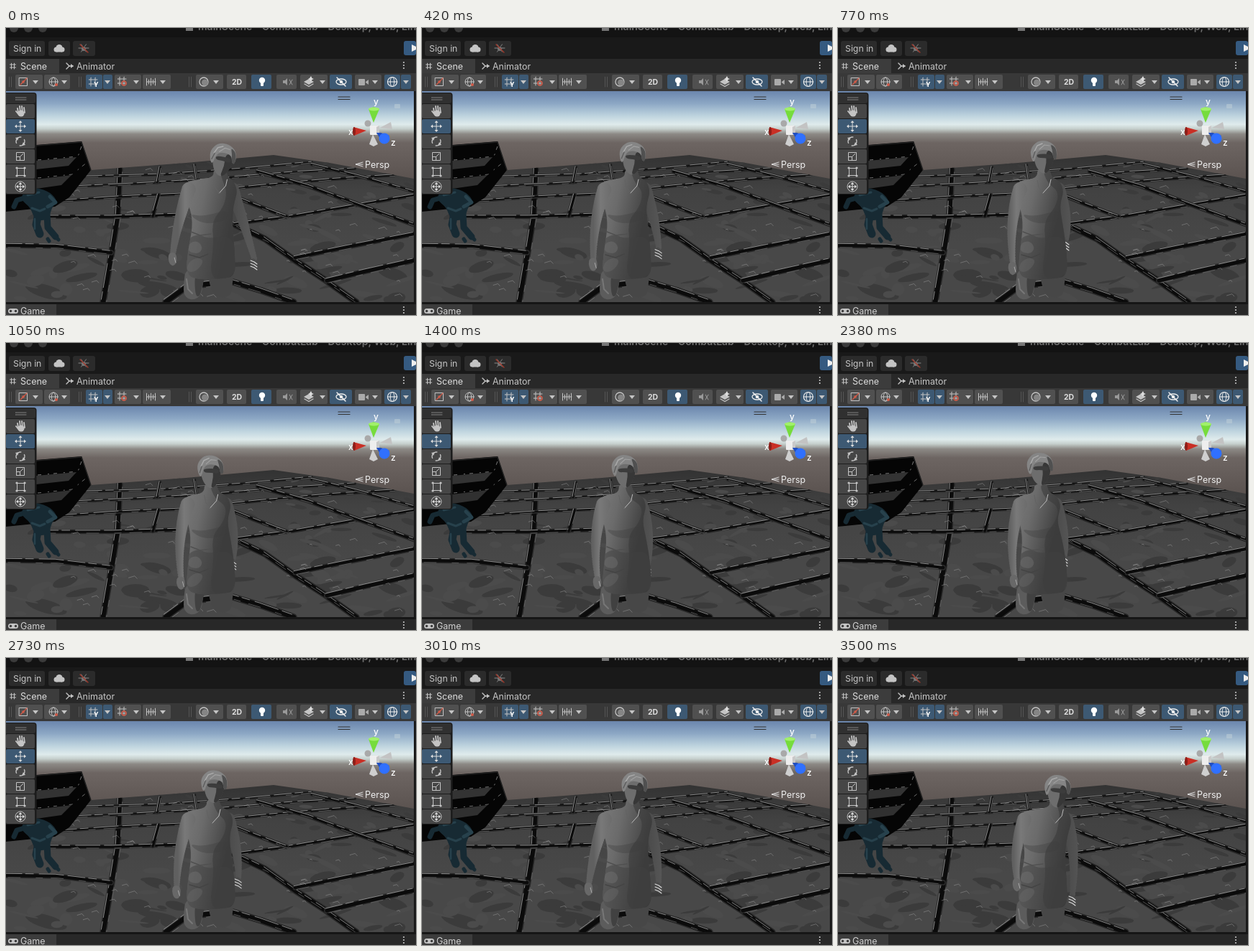
These frames come from a looping animation (570x400 px, 3.57 s). An HTML page with a canvas:

```html
<!DOCTYPE html>
<html lang="en">
<head>
<meta charset="utf-8">
<title>Scene view</title>
<style>
  html, body { margin: 0; width: 100%; height: 100%; overflow: hidden; background: #191919; }
  canvas { display: block; }
</style>
</head>
<body>
<canvas id="stage" width="570" height="400"></canvas>
<script>
const LOOP = 3570, STEP = 70;
const stage = document.getElementById('stage').getContext('2d');
const backdrop = document.createElement('canvas');
backdrop.width = 570;
backdrop.height = 400;
let c = backdrop.getContext('2d');

let seed = 11;
const rand = () => (seed = (seed * 16807) % 2147483647) / 2147483647;

// ---- drawing helpers ----
function box(x, y, w, h, fill, r = 0) {
  c.fillStyle = fill;
  c.beginPath();
  c.roundRect(x, y, w, h, r);
  c.fill();
}
function trace(p) {
  c.beginPath();
  for (let i = 0; i < p.length; i += 2) c.lineTo(p[i], p[i + 1]);
}
function poly(p, fill) {
  trace(p);
  c.fillStyle = fill;
  c.fill();
}
function line(p, color, w = 1) {
  trace(p);
  c.strokeStyle = color;
  c.lineWidth = w;
  c.stroke();
}
function disc(x, y, rx, fill, ry = rx, angle = 0) {
  c.fillStyle = fill;
  c.beginPath();
  c.ellipse(x, y, rx, ry, angle, 0, 7);
  c.fill();
}
function ring(x, y, rx, color, ry = rx, w = 1) {
  c.strokeStyle = color;
  c.lineWidth = w;
  c.beginPath();
  c.ellipse(x, y, rx, ry, 0, 0, 7);
  c.stroke();
}
// Closed smooth outline through the midpoints of a polygon
function blob(p, fill) {
  const n = p.length, at = i => p[(i + n) % n];
  c.beginPath();
  for (let i = 0; i < n; i += 2) {
    const mx = (at(i) + at(i + 2)) / 2, my = (at(i + 1) + at(i + 3)) / 2;
    if (!i) c.moveTo((at(-2) + at(0)) / 2, (at(-1) + at(1)) / 2);
    c.quadraticCurveTo(at(i), at(i + 1), mx, my);
  }
  c.fillStyle = fill;
  c.fill();
}
function text(s, x, y, size = 12.5, color = '#c4c4c4', weight = 400) {
  c.font = `${weight} ${size}px Inter, sans-serif`;
  c.fillStyle = color;
  c.fillText(s, x, y);
}
function ramp(x0, y0, x1, y1, ...stops) {
  const g = c.createLinearGradient(x0, y0, x1, y1);
  stops.forEach(([at, color]) => g.addColorStop(at, color));
  return g;
}

// ---- 3D view ----
const SEAMS = [
  [158, 197, 155, 262, 147, 312, 135, 382],
  [110, 207, 220, 204, 330, 196, 425, 187],
  [95, 221, 180, 217, 280, 211, 400, 201, 485, 196],
  [75, 241, 160, 235, 250, 231, 350, 220, 450, 211, 540, 205],
  [50, 263, 150, 263, 245, 260],
  [0, 303, 70, 304, 146, 313],
  [214, 194, 210, 215], [262, 191, 265, 212], [212, 233, 204, 262],
  [318, 274, 360, 294, 402, 324, 442, 350, 487, 382],
  [318, 273, 400, 262, 480, 248, 567, 233],
  [402, 320, 480, 304, 567, 287],
  [318, 235, 345, 246, 390, 263],
  [350, 200, 420, 220, 490, 246, 567, 274],
  [425, 190, 490, 206, 567, 228],
  [446, 352, 500, 339, 567, 324],
  [222, 382, 252, 360, 312, 353, 355, 366, 400, 382]
];

function drawFloor() {
  c.save();
  trace([0, 256, 70, 245, 118, 198, 250, 188, 372, 177, 450, 188, 567, 210, 567, 382, 0, 382]);
  c.clip();
  box(0, 170, 567, 212, ramp(0, 178, 0, 300, [0, '#333'], [.4, '#424242'], [1, '#484848']));
  for (let i = 0; i < 150; i++) {
    const y = 185 + 197 * rand(), s = (y - 165) / 200;
    disc(567 * rand(), y, 5 + 25 * s * rand(), i % 2 ? '#3b3b3b' : '#4b4b4b', 1 + 8 * s * rand(), rand() - .5);
  }
  c.lineCap = c.lineJoin = 'round';
  for (const seam of SEAMS) {
    const w = 1.6 + Math.max(0, seam[seam.length - 1] - 190) / 40;
    line(seam, '#292929', w + 3);
    line(seam, '#0b0b0b', w);
    c.setLineDash([24, 5, 11, 8, 34, 6]);
    line(seam.map((v, i) => v - (i % 2 ? w * .6 : w * .4)), 'rgba(190,190,190,.75)', .9);
    c.setLineDash([17, 22, 9, 12]);
    line(seam.map(v => v + w * .6), 'rgba(150,150,150,.6)', .8);
    c.setLineDash([]);
  }
  for (let i = 0; i < 55; i++) {
    const x = 567 * rand(), y = 195 + 180 * rand(), l = 2 + 7 * rand();
    line([x, y, x + l, y - l * .3, x + l * 1.4, y + 1], 'rgba(165,165,165,.55)', .8);
  }
  c.restore();
}

function drawStairs() {
  poly([0, 166, 42, 163, 105, 158, 118, 198, 88, 236, 68, 249, 0, 256], '#050505');
  poly([42, 185, 98, 180, 87, 192, 42, 197], '#333');
  poly([42, 211, 91, 205, 77, 219, 42, 224], '#303030');
  line([42, 164, 105, 159, 118, 198], '#202020', 1.5);
  c.setLineDash([5, 9, 2, 6]);
  line([44, 184, 100, 179, 106, 162], '#999', .8);
  line([44, 209, 92, 204, 113, 187], '#888', .8);
  c.setLineDash([]);
}

function drawStatue() {
  const dark = '#172a33', mid = '#27414c';
  c.lineCap = c.lineJoin = 'round';
  line([29, 236, 15, 240, 11, 249], dark, 7);
  line([45, 258, 42, 274, 47, 287], dark, 11);
  line([57, 260, 58, 278, 69, 291], dark, 9);
  line([58, 294, 60, 297], dark, 5);
  line([69, 291, 73, 295], dark, 5);
  blob([24, 228, 42, 222, 62, 229, 72, 242, 64, 249, 59, 268, 40, 268, 34, 250, 21, 240], dark);
  line([61, 235, 69, 243, 58, 249], mid, 5);
  line([36, 251, 47, 255, 54, 252], mid, 3);
  line([40, 266, 40, 280], mid, 2.5);
  line([30, 233, 46, 229], mid, 3);
}

function drawAxes() {
  const label = (s, x, y) => text(s, x, y, 12, '#fff', 500);
  poly([520, 139, 535, 131, 537, 141], '#c3c3c3');
  disc(503, 133, 4.5, '#a9a9a9');
  poly([510, 148, 505, 162, 511, 165, 517, 162], '#cfcfcf');
  poly([504, 113, 511, 110, 519, 113, 511, 132], '#76dc3c');
  disc(511.5, 113, 7.5, '#a1f06b', 2.5);
  poly([483, 138, 501, 143, 484, 150], '#c92f25');
  disc(484, 144, 2, '#8d1e18', 6);
  box(506, 136, 13, 13, '#eee', 1);
  poly([515, 138, 519, 136, 519, 147, 515, 149], '#c9c9c9');
  poly([515, 146, 521, 146, 533, 150, 524, 161], '#214fc0');
  disc(526, 154, 7.5, '#3070ff');
  label('y', 511, 107);
  label('x', 476, 149);
  label('z', 535, 164);
  line([496, 187, 486, 190, 496, 193], '#ddd');
  line([486, 190, 496, 190], '#ddd');
  text('Persp', 499, 194.5, 12.5, '#eee');
  box(540, 106, 8, 6, 'rgba(190,205,215,.55)', 1);
  for (const y of [96, 99.5]) line([462, y, 478, y], '#333', 1.2);
}

function drawView() {
  box(0, 88, 567, 294, ramp(0, 88, 0, 210, [0, '#6b86ad'], [.14, '#8ca7c4'], [.28, '#bdd3de'],
    [.38, '#dfebec'], [.43, '#c6d0cd'], [.49, '#8c8985'], [.59, '#6d6562'], [1, '#5b5350']));
  drawFloor();
  drawStairs();
  drawStatue();
  drawAxes();
}

// ---- editor chrome ----
const INK = '#c4c4c4', BUTTON = '#505050', ACTIVE = '#3d5973';
const caret = (x, y = 75) => poly([x - 4, y - 2, x + 4, y - 2, x, y + 3], INK);
const dots = (x, y) => [-4, 0, 4].forEach(d => disc(x, y + d, 1.1, INK));
function grid(x, y, s) {
  for (const d of [-s / 2, s / 2]) {
    line([x - s, y + d, x + s, y + d], INK);
    line([x + d, y - s, x + d, y + s], INK);
  }
}

function drawTopBars() {
  box(0, 0, 570, 43, '#191919');
  box(0, 0, 570, 13, '#131313');
  [11, 31, 51].forEach(x => disc(x, 0, 6, '#3b3b3b'));
  box(250, -5, 10, 9, '#777');
  text('mainScene - CombatLab - Desktop, Web, Linux', 267, 3, 14, '#6e6e6e', 600);
  for (const [x, w] of [[4, 50], [59, 30], [93, 31]]) box(x, 18, w, 21, '#2b2b2b', 3);
  text('Sign in', 10, 33, 12.3);
  [[70, 30, 3.5], [74, 27.5, 4.5], [78, 30, 3.5]].forEach(p => disc(...p, INK));
  box(70, 29, 8, 4.5, INK);
  for (let a = 0; a < 6; a++) {
    const x = Math.cos(a * 1.047), y = Math.sin(a * 1.047);
    line([108 + x * 3, 28 + y * 3, 108 + x * 7, 28 + y * 6], '#888');
  }
  disc(108, 29, 3, '#777');
  line([103, 23, 114, 34], '#a3392b', 1.3);
  box(553, 18, 17, 20, '#355a80', 3);
  poly([564, 23, 570, 26, 570, 30, 564, 33], '#eee');

  box(0, 43, 570, 20, '#282828');
  box(0, 43, 74, 20, '#3c3c3c');
  grid(9.5, 53, 4);
  text('Scene', 20, 57.5, 12.5, '#ddd');
  line([84, 49, 88, 53, 93, 53], INK, 1.4);
  line([84, 57, 88, 53], INK, 1.4);
  poly([90, 50, 94, 53, 90, 56], INK);
  text('Animator', 98, 57.5);
  dots(553, 52);
}

function drawTools() {
  box(0, 63, 570, 25, '#383838');
  [4, 7, 101, 104, 254, 257].forEach(x => line([x + .5, 68, x + .5, 82], '#555'));
  const buttons = [[13, 38], [53, 36], [111, 23, 1], [135, 13, 1], [151, 37], [190, 39], [264, 38], [307, 27],
    [341, 28, 1], [376, 28], [409, 38], [450, 31, 1], [485, 37], [526, 22, 1], [549, 14, 1]];
  for (const [x, w, on] of buttons) box(x, 65, w, 20, on ? ACTIVE : BUTTON, 2);
  [41, 81, 141, 181, 218, 292, 440, 513, 556].forEach(x => caret(x));

  c.strokeStyle = INK;
  c.lineWidth = 1;
  c.strokeRect(18.5, 69.5, 11, 11);
  line([20, 79, 29, 70], '#d05a48', 1.3);
  disc(24, 75, 1.8, '#d05a48');
  ring(66, 75, 6, INK);
  ring(66, 75, 2.7, INK, 6);
  line([60, 75, 72, 75], INK);
  disc(70, 79, 2, '#d05a48');
  grid(121, 75, 6);
  text('Y', 122, 82, 9, '#fff', 700);
  grid(161, 74, 6);
  ring(164, 77, 3, '#d05a48', 3, 1.6);
  for (let i = 0; i < 5; i++) line([195.5 + i * 3, 70 + (i % 2) * 2, 195.5 + i * 3, 80 - (i % 2) * 2], INK);
  line([195, 75, 208, 75], INK);
  ring(275, 75, 6, INK, 6, 1.3);
  disc(276.5, 76, 4.5, '#858585');
  text('2D', 314, 79, 10.5, '#ddd', 700);
  disc(356, 73, 4.2, '#fff');
  box(354, 76, 4, 5, '#fff', 1);
  poly([385, 73, 388, 73, 391, 70, 391, 80, 388, 77, 385, 77], '#999');
  line([394, 72, 398, 79], '#999');
  line([398, 72, 394, 79], '#999');
  poly([414, 75, 421, 71, 428, 75, 421, 79], INK);
  line([415, 78, 421, 81.5, 427, 78], INK, 1.3);
  poly([424, 67, 425.5, 70, 428, 71, 425.5, 72, 424, 75, 422, 72, 420, 71, 422, 70], '#ddd');
  ring(466, 75, 7, '#eee', 4, 1.3);
  disc(466, 75, 2.3, '#eee');
  line([460, 69, 472, 81], '#eee', 1.5);
  box(490, 71, 9, 9, '#aaa', 1);
  poly([500, 75, 504, 72, 504, 79, 500, 76], '#aaa');
  ring(537, 75, 6.5, '#eee', 6.5, 1.2);
  ring(537, 75, 2.8, '#eee', 6.5);
  line([530, 75, 544, 75], '#eee');
}

function drawPalette() {
  box(-4, 90, 46.5, 142, '#1c1c1c', 4);
  box(-4, 91, 45, 14, '#303030', 3);
  for (const y of [97, 100]) line([13, y, 28, y], '#808080');
  for (let i = 0; i < 6; i++) box(0, 106 + i * 21, 40, 20, i === 1 ? ACTIVE : '#464646', 2);
  c.lineCap = 'round';
  disc(21, 119, 4.5, INK);
  [[16, 112], [19, 109], [22, 109], [25, 111]].forEach(([x, y]) => line([x, y, x + 1, 118], INK, 1.8));
  line([14, 116, 18, 121], INK, 2);
  c.lineCap = 'butt';
  const arrows = (y, r) => {
    line([20 - r, y, 20 + r, y], '#ddd');
    line([20, y - r, 20, y + r], '#ddd');
    for (let i = 0; i < 4; i++) {
      c.save();
      c.translate(20, y);
      c.rotate(i * Math.PI / 2);
      poly([r + 1, 0, r - 2, -2.5, r - 2, 2.5], '#ddd');
      c.restore();
    }
  };
  arrows(137, 7);
  for (const a of [-.5, 2.64]) {
    c.beginPath();
    c.arc(20, 158, 6, a, a + 2.3);
    c.strokeStyle = INK;
    c.lineWidth = 1.4;
    c.stroke();
  }
  poly([13, 153, 18, 152, 16, 157], INK);
  poly([27, 163, 22, 164, 24, 159], INK);
  c.lineWidth = 1;
  c.strokeRect(14.5, 173.5, 11, 11);
  c.strokeRect(14.5, 179.5, 5, 5);
  line([19, 180, 24, 175], INK);
  c.strokeRect(15.5, 195.5, 10, 10);
  for (const x of [15, 26]) for (const y of [195, 206]) disc(x, y, 1.6, INK);
  ring(20, 221, 7, INK);
  arrows(221, 5);
}

function drawBottomBar() {
  box(567, 88, 3, 312, '#191919');
  box(0, 382, 570, 3, '#161616');
  box(0, 385, 570, 15, '#282828');
  box(0, 385, 70, 15, '#3c3c3c');
  box(3, 391, 14, 7, INK, 3.5);
  disc(6.5, 394.5, 1.7, '#3c3c3c');
  disc(13.5, 394.5, 1.7, '#3c3c3c');
  text('Game', 20, 398.5, 12.5, '#d0d0d0');
  dots(553, 393);
}

// ---- figure ----
// time, head x y tilt, shoulder left and right x, left hand x y, right hand x y
const POSES = [
  [0, 301, 183, .16, 248, 320, 232, 321, 345, 329],
  [770, 286, 179, 0, 247, 312, 243, 334, 317, 302],
  [1400, 282, 178, -.03, 246, 310, 244, 333, 314, 316],
  [1890, 289, 176, .04, 247, 318, 239, 327, 328, 318],
  [2100, 287, 174, .02, 247, 318, 229, 321, 336, 316],
  [2380, 281, 175, -.04, 247, 308, 245, 331, 315, 303],
  [3010, 295, 181, .12, 248, 319, 232, 321, 329, 320],
  [3220, 300, 183, .14, 249, 321, 233, 320, 347, 327],
  [3500, 305, 185, .08, 253, 323, 249, 315, 326, 337]
];

function poseAt(t) {
  let i = 0;
  while (i < POSES.length - 2 && t > POSES[i + 1][0]) i++;
  const a = POSES[i], b = POSES[i + 1];
  const u = Math.min(1, (t - a[0]) / (b[0] - a[0])), k = u * u * (3 - 2 * u);
  return a.map((v, j) => v + (b[j] - v) * k);
}

// Tapering limb along a bend from shoulder to hand
function limb(x0, y0, x1, y1, x2, y2, fill) {
  c.beginPath();
  for (let i = 0; i <= 30; i++) {
    const u = i / 30, v = 1 - u, r = 10 - 6 * u;
    const x = v * v * x0 + 2 * u * v * x1 + u * u * x2;
    const y = v * v * y0 + 2 * u * v * y1 + u * u * y2;
    c.moveTo(x + r, y);
    c.arc(x, y, r, 0, 7);
  }
  c.fillStyle = fill;
  c.fill();
}

function drawHead(x, y, tilt) {
  c.save();
  c.translate(x, y);
  c.rotate(tilt);
  blob([-15, -9, -9, -19, 8, -19, 15, -7, 13, 10, 5, 23, -3, 24, -12, 13], '#6d6d6d');
  blob([3, -9, 16, -8, 13, 11, 5, 23, 0, 23, 4, 9], '#373737');
  blob([-10, -4, 13, -3, 11, 4, 1, 2, -9, 2], '#3c3c3c');
  blob([-17, 4, -19, -10, -9, -22, 6, -22, 17, -14, 19, 0, 14, 5, 12, -7, 0, -10, -9, -7, -13, 9], '#858585');
  blob([9, -18, 18, -11, 18, 5, 13, 3, 12, -9], '#505050');
  line([-13, -7, -9, -15, -2, -18], '#aaa', 1.5);
  line([-6, -10, 1, -16, 8, -15], '#a0a0a0', 1.2);
  line([-15, 2, -12, -7], '#595959', 1.2);
  c.restore();
}

function drawFigure(t) {
  const [, hx, hy, tilt, sl, sr, lx, ly, rx, ry] = poseAt(t);
  const lean = (hx - 290) * .15;
  c.lineCap = c.lineJoin = 'round';

  // far arm
  limb(sr - 6, 225, sr + 9, 265, rx, ry - 8, ramp(sr - 8, 0, sr + 16, 0, [0, '#494949'], [1, '#575757']));
  disc(rx, ry, 4.5, '#4b4b4b', 8, -.25);
  for (const d of [0, 4, 8]) line([rx - 5, ry - 5 + d, rx, ry - 3 + d, rx + 4, ry + d], '#ddd', 1.1);

  // legs
  blob([250, 335, 279, 335, 274, 352, 272, 372, 260, 380, 247, 374, 247, 355], '#5c5c5c');
  blob([281, 335, 318, 335, 314, 361, 313, 373, 296, 377, 283, 362], '#474747');
  blob([262, 340, 280, 340, 274, 354, 270, 374, 263, 374], '#414141');
  line([251, 350, 253, 364, 259, 370], '#777', 2);

  // torso and clothes
  const nx = hx - tilt * 22;
  const outline = [nx - 9, 196, nx - 9, 209, sl + 8, 212, sl - 3, 220, sl - 1, 239, 255 + lean, 252, 258 + lean, 277,
    253, 309, 250, 345, 270, 351, 302, 349, 319, 346, 318, 311, 313 + lean, 273, sr - 4, 247, sr + 2, 228, sr - 3, 214,
    nx + 10, 207, nx + 9, 196];
  blob(outline, ramp(sl, 220, sr, 235, [0, '#797979'], [.4, '#6b6b6b'], [.72, '#555'], [1, '#414141']));
  c.save();
  c.clip();
  blob([nx - 2, 196, nx + 14, 197, sr + 8, 212, sr + 9, 248, 322, 352, 282, 352, 289, 302, 286, 269, 303, 249, 307, 228,
    nx + 5, 216], 'rgba(57,57,57,.55)');
  blob([248, 298, 266, 286, 281, 294, 318, 288, 324, 352, 245, 353, 250, 321], 'rgba(65,65,65,.5)');
  blob([255, 259, 269, 262, 286, 260, 307, 253, 309, 267, 286, 273, 267, 270], 'rgba(62,62,62,.35)');
  blob([254, 300, 266, 296, 274, 306, 268, 315, 253, 312], 'rgba(125,125,125,.35)');
  blob([253, 327, 266, 319, 276, 325, 264, 340, 251, 340], 'rgba(120,120,120,.28)');
  line([257, 284, 270, 289, 285, 287], '#505050', 1.5);
  line([255, 316, 269, 320, 281, 315], '#444', 1.5);
  line([nx + 10, 211, nx + 8, 220, nx - 1, 230], '#bbb', 1);
  line([nx - 9, 212, nx - 7, 222, nx - 1, 230], '#626262', 1);
  c.restore();

  // near arm
  limb(sl + 6, 225, sl - 10, 270, lx, ly - 6, ramp(sl - 9, 0, sl + 16, 0, [0, '#606060'], [.4, '#797979'], [1, '#6c6c6c']));
  blob([lx - 5, ly - 8, lx + 4, ly - 8, lx + 6, ly + 3, lx + 2, ly + 11, lx - 4, ly + 9, lx - 7, ly], '#686868');
  line([lx + 2, ly - 1, lx + 4, ly + 6], '#aaa', 1);
  drawHead(hx, hy, tilt);
}

drawView();
drawTopBars();
drawTools();
drawPalette();
drawBottomBar();
c = stage;

function frame(now) {
  c.drawImage(backdrop, 0, 0);
  drawFigure(Math.floor((now % LOOP) / STEP) * STEP);
  requestAnimationFrame(frame);
}
frame(performance.now());
</script>
</body>
</html>
```
